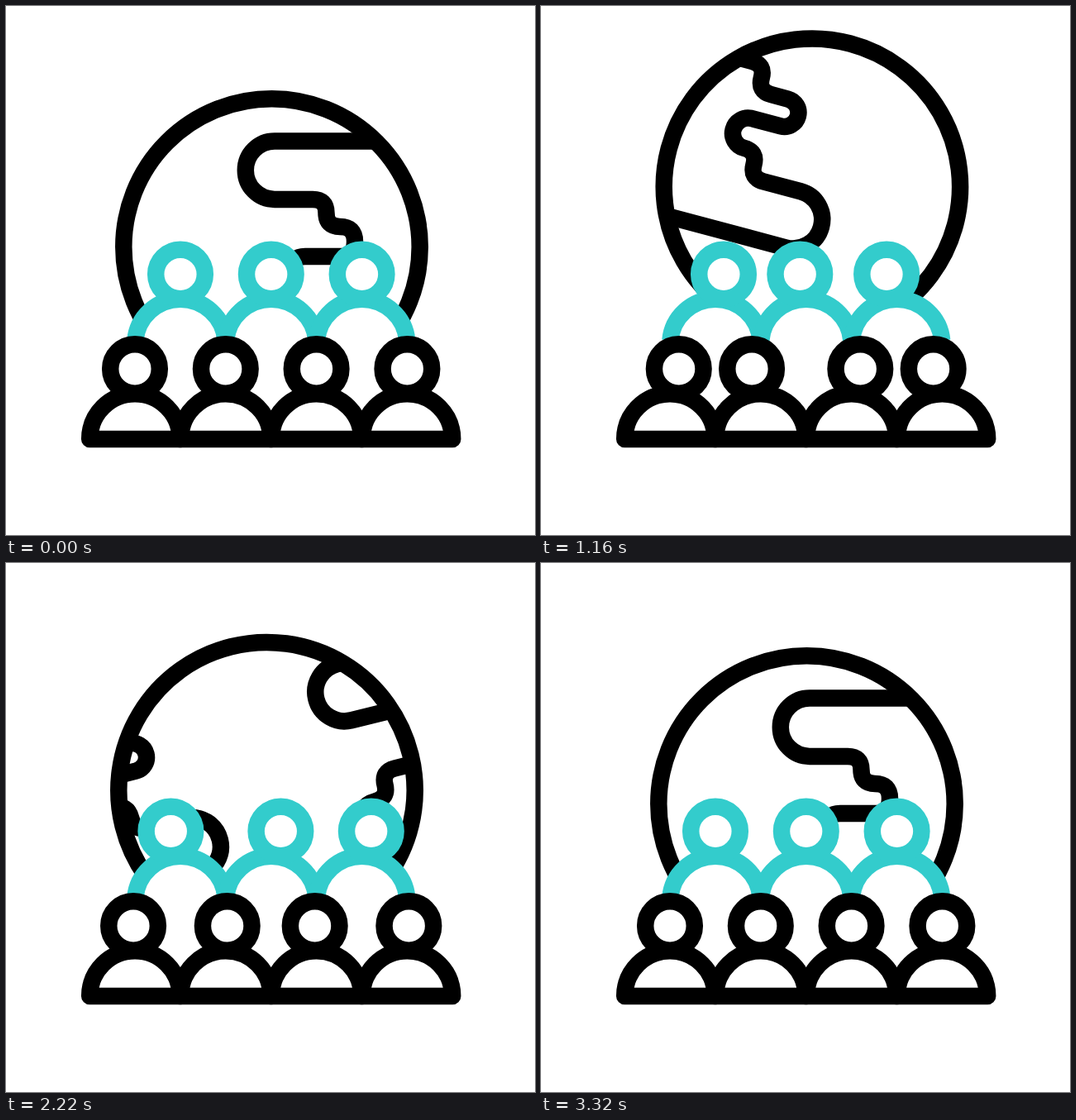
An HTML page for the animation above (3.6 s loop, 640 px wide and 640 px high).

```html
<!DOCTYPE html>
<html lang="en">
<head>
<meta charset="utf-8">
<title>People and globe</title>
<style>
  html, body { margin: 0; width: 100%; height: 100%; overflow: hidden; background: #fff; }
  svg { display: block; width: 100vw; height: 100vh; }
  svg * { stroke-width: 20.5; stroke-linejoin: round; }
  .line { fill: none; stroke: #000; }
  .person { fill: #fff; }
</style>
</head>
<body>
<svg viewBox="0 0 640 640">
  <defs>
    <clipPath id="disc"><circle r="182"/></clipPath>
  </defs>
  <g id="globe">
    <g clip-path="url(#disc)">
      <g id="land" class="line"></g>
    </g>
    <circle class="line" r="179.2"/>
  </g>
  <rect x="140" y="404" width="362" height="100" fill="#fff"/>
  <g id="back" class="person" stroke="#33cccc"></g>
  <g id="front" class="person" stroke="#000"></g>
</svg>
<script>
const LOOP = 3600, STEP = 20;
const CX = 321.5, CY = 291.5;
const GAP = 109.8, SHOULDER = 54.8, HEAD = 29.8;
const byId = id => document.getElementById(id);

// Legs of motion: [start, duration, change]
const LIFT = [[220, 785, -77], [985, 1015, 58], [2000, 910, 19]];
const TILT = [[320, 880, 15], [1160, 960, -29.5], [2120, 800, 14.5]];
const SPIN = [[420, 870, 221], [1425, 1130, -131], [2540, 780, -90]];
const SWAY = [[325, 420, 1], [1080, 420, -2], [2030, 420, 2], [2540, 420, -1]];

const ease = u => (1 - Math.cos(Math.PI * Math.min(1, Math.max(0, u)))) / 2;
const travel = (legs, t) =>
  legs.reduce((sum, [start, span, change]) => sum + change * ease((t - start) / span), 0);

// inward and outward: head offsets at the two ends of the sway
const ROWS = [
  { id: "back", x: 211, headY: 324.5, base: 409.5, delay: 200,
    inward: [10, -7.5, -12.5], outward: [-11.6, 11.6, 11.2] },
  { id: "front", x: 156, headY: 439, base: 524, delay: 0,
    inward: [13, -13, 13, -13], outward: [-13, 13, -13, 13] }
];

function add(parent, tag, attrs) {
  const el = document.createElementNS("http://www.w3.org/2000/svg", tag);
  for (const k in attrs) el.setAttribute(k, attrs[k]);
  return parent.appendChild(el);
}

// Coastlines: both share the same S-shaped step
const step = dir => `q${16.5 * dir} 0 ${16.5 * dir} 16.5t${16.5 * dir} 16.5`;
const arc = (r, sweep) => `a${r} ${r} 0 0 ${sweep} 0 ${2 * r}`;
const land = byId("land");
const east = "M560 163.5H325" + arc(35.2, 0) + "H371" + step(1) +
  "q18 0 18 18t-18 18H362" + step(-1) + arc(26, 0) + "h15";
const west = "M-200 163.5H3" + step(1) + "H57" + arc(17, 1) + "H21" + arc(18.5, 0) +
  step(1) + "H100.5" + arc(35.2, 1) + "H-200";
for (const d of [east, west]) add(land, "path", { d });

for (const row of ROWS) {
  const g = byId(row.id), isFront = row.id === "front";
  const xs = row.inward.map((_, i) => row.x + i * GAP);
  const close = isFront ? "Z" : "";
  const cut = isFront ? 0 : 5;   // the back row ends just above the front heads
  const half = Math.sqrt(SHOULDER ** 2 - cut ** 2), y = row.base - cut;
  for (const x of xs) {
    add(g, "path", { d: `M${x - half} ${y}A${SHOULDER} ${SHOULDER} 0 0 1 ${x + half} ${y}${close}` });
  }
  row.heads = xs.map(x => ({ x, el: add(g, "circle", { cy: row.headY, r: HEAD }) }));
}

function draw(t) {
  const tilt = travel(TILT, t);
  const x = CX + tilt * 0.43, y = CY + travel(LIFT, t);
  byId("globe").setAttribute("transform", `translate(${x} ${y}) rotate(${tilt})`);
  land.setAttribute("transform", `translate(${travel(SPIN, t) - CX} ${-CY})`);
  for (const row of ROWS) {
    const pose = travel(SWAY, t - row.delay);
    const reach = pose > 0 ? row.inward : row.outward;
    row.heads.forEach((h, i) => h.el.setAttribute("cx", h.x + Math.abs(pose) * reach[i]));
  }
}

let start;
function tick(now) {
  start ??= now;
  const t = (now - start) % LOOP;
  draw(Math.floor(t / STEP) * STEP);
  requestAnimationFrame(tick);
}
draw(0);
requestAnimationFrame(tick);
</script>
</body>
</html>
```
